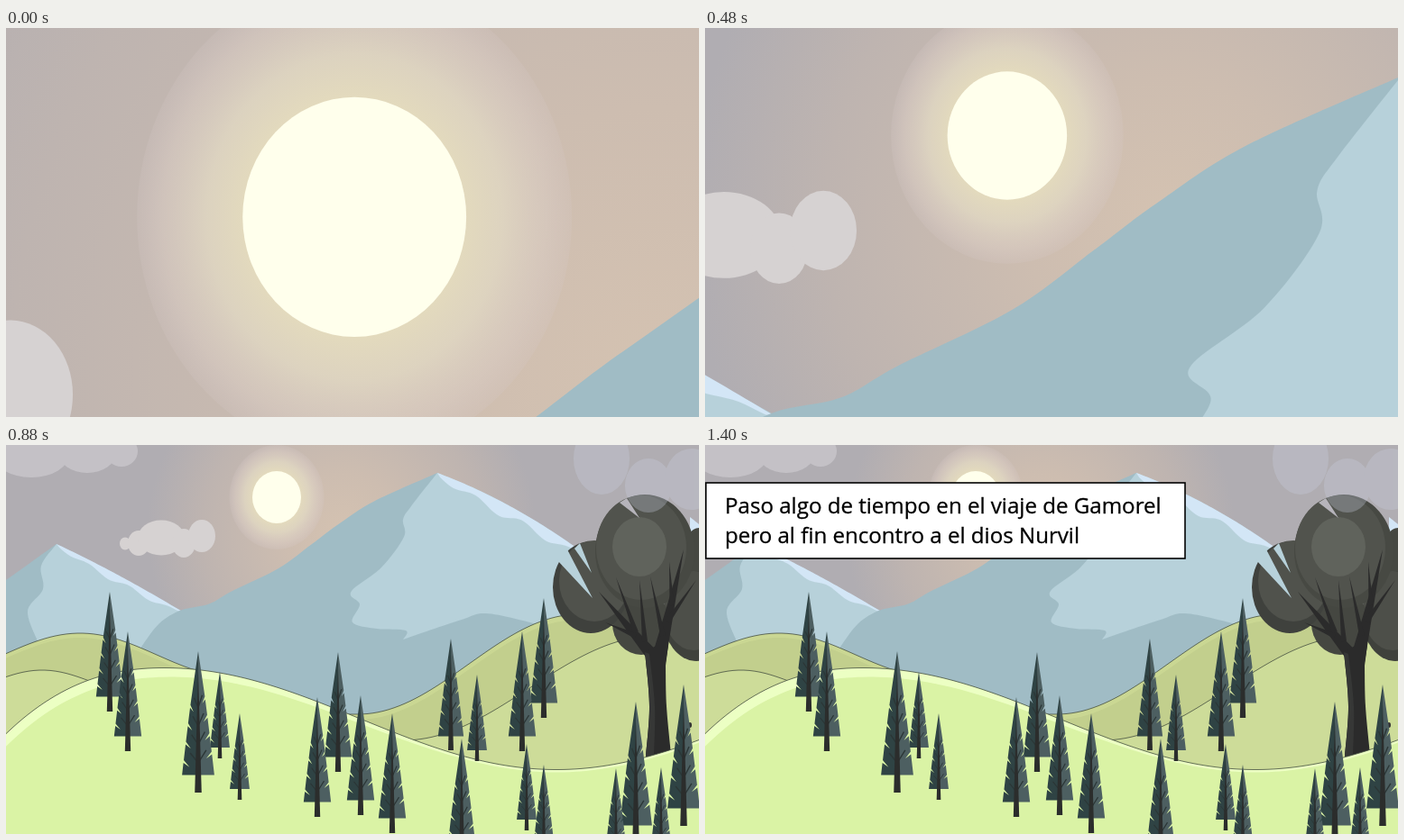
Animation, 768 px wide and 432 px high, one loop 1.92 s. Source, as an HTML page:

```html
<!DOCTYPE html>
<html lang="es">
<head>
<meta charset="utf-8">
<title>Paisaje</title>
<style>
  html, body { margin: 0; width: 100%; height: 100%; overflow: hidden; background: #b1aeb3; }
  svg { display: block; width: 100vw; height: 100vh; }
  text { font-family: "Open Sans", "Noto Sans", sans-serif; font-size: 24.1px; stroke: #000; stroke-width: .3; }
</style>
</head>
<body>
<svg viewBox="0 0 768 432">
  <defs>
    <radialGradient id="sky" gradientUnits="userSpaceOnUse" cx="372" cy="96" r="215">
      <stop offset="0" stop-color="#d4c2b1"/>
      <stop offset=".3" stop-color="#cdbdb0"/>
      <stop offset=".72" stop-color="#beb4b0"/>
      <stop offset="1" stop-color="#b0adb2"/>
    </radialGradient>
    <radialGradient id="halo">
      <stop offset=".5" stop-color="#e3dabd"/>
      <stop offset=".68" stop-color="#e0d7c2" stop-opacity=".85"/>
      <stop offset=".88" stop-color="#dacdc4" stop-opacity=".55"/>
      <stop offset="1" stop-color="#d6c9c8" stop-opacity=".2"/>
    </radialGradient>
    <g id="pine"></g>
  </defs>
  <g id="scene"></g>
  <g id="caption">
    <rect x="1" y="42" width="531" height="84" fill="#fff" stroke="#000" stroke-width="1.6"/>
    <text x="22" y="76">Paso algo de tiempo en el viaje de Gamorel</text>
    <text x="22" y="109">pero al fin encontro a el dios Nurvil</text>
  </g>
</svg>
<script>
const scene = document.getElementById("scene");
const caption = document.getElementById("caption");
const { PI, sin, cos, min, max, sqrt, hypot } = Math;
const clamp = v => min(1, max(0, v));

// Smooth curve through "x,y" points; "|" marks a corner between curves.
function smoothPath(spec) {
  return spec.split("|").map((part, i) => {
    const pts = part.trim().split(/\s+/).map(p => p.split(",").map(Number));
    let d = `${i ? "L" : "M"}${pts[0]}`;
    for (let k = 0; k < pts.length - 1; k++) {
      const a = pts[k - 1] || pts[k], b = pts[k], c = pts[k + 1], e = pts[k + 2] || c;
      const handle = (p, q, r, sign) => [0, 1].map(n => p[n] + sign * (r[n] - q[n]) / 6);
      d += `C${handle(b, a, c, 1)} ${handle(c, b, e, -1)} ${c}`;
    }
    return d;
  }).join("") + "Z";
}

const shape = (fill, spec) => `<path fill="${fill}" d="${smoothPath(spec)}"/>`;
const poly = (fill, points, extra = "") => `<polygon fill="${fill}" points="${points}" ${extra}/>`;
const oval = (fill, x, y, rx, ry) => `<ellipse fill="${fill}" cx="${x}" cy="${y}" rx="${rx}" ry="${ry}"/>`;
const cloud = (fill, opacity, puffs) =>
  `<g opacity="${opacity}">${puffs.map(p => oval(fill, ...p)).join("")}</g>`;

// Points of y = f(x), left to right.
function plot(f, from, to, step = 3) {
  const pts = [];
  for (let x = from; x < to; x += step) pts.push([x, f(x)]);
  return [...pts, [to, f(to)]];
}

const DARK_ROCK = "#a0bcc5", LIGHT_ROCK = "#b7d1da", SNOW = "#d3e6f6";

const sky = '<rect width="768" height="432" fill="url(#sky)"/>'
  + oval("url(#halo)", 300, 58, 52.5, 58)
  + oval("#ffffec", 300, 58, 27, 29);

const smallCloud = cloud("#d6d2d2", 1,
  [[132, 109.5, 6, 7], [147, 109, 12, 14], [172, 103, 26, 19.5], [197, 109, 13, 16], [217, 101, 15, 18]]);
const topClouds =
  cloud("#dddbe0", .45, [[28, 10, 42, 26], [90, 8, 32, 23], [128, 7, 18, 17]])
  + cloud("#cbd1e2", .3, [[660, 15, 31, 40], [712, 45, 26, 30], [760, 38, 30, 34]]);

// A slope falling to the right of a summit, and the rippled snow along it.
const slope = (x0, y0, fall, bend) => x => y0 + fall * (x - x0) + bend * (x - x0) ** 2;
function snow(ridge, from, to, depth) {
  const lower = x => {
    const u = clamp((x - from) / (to - from));
    return ridge(x) + depth * sqrt(max(0, sin(PI * u))) * (1 + .35 * sin(6 * PI * u));
  };
  return poly(SNOW, [...plot(ridge, from, to), ...plot(lower, from, to).reverse()].join(" "));
}
const leftRidge = slope(56, 110, .47, .0005);
const rightRidge = slope(478, 31, .37, .0011);

const leftMountain =
  shape(DARK_ROCK, "0,150 28,130 56,110 | 194,184 | 194,260 0,260")
  + shape(LIGHT_ROCK, "56,110 39,134 41,160 24,185 37,222 | 160,240 194,184 | 110,137 56,110")
  + snow(leftRidge, 56, 194, 8);

const rightMountain =
  poly(SNOW, "758,80 768,88 768,120 758,110")
  + shape(DARK_ROCK, "150,224 170,198 194,183.5 225,176.5 251,162 302,137 339,110 367,89 408,62.5 478,31 | 640,118 | 720,330 150,330")
  + shape(LIGHT_ROCK, "478,31 449,68 440,83 441,102 416,136 382.4,163 392,177 384,197 411,204 443,206 440,216 | 440,216 504,194.3 535,187.3 600,202 | 720,230 720,160 | "
      + plot(rightRidge, 478, 640, 40).reverse().join(" "))
  + snow(rightRidge, 478, 640, 13);

// Cosine hill between the crest (or trough) at x0 and the next turn half a wave away.
const wave = (x0, y0, rise, half) => x => y0 + rise / 2 * (1 - cos(PI * (x - x0) / half));
const between = (f, a, b) => x => f(min(b, max(a, x)));
const hill = (fill, f, from, to, line = true) =>
  poly(fill, [...plot(f, from, to, 6), [to, 440], [from, 440]].join(" "),
    line ? 'stroke="#465040" stroke-width=".8"' : "");
function litHill(light, body, f, from, to, rim) {
  return hill(light, f, from, to) + hill(body, x => f(x) + rim(x), from, to, false);
}

const frontTop = x => wave(175, 247.5, 113, 435)(x) + 6.3e-6 * max(0, 175 - x) ** 3;
const backHills =
  litHill("#cad793", "#c2cf8d", wave(82, 209, 48, 170), -5, 235, () => 5)
  + hill("#cddc99", wave(40, 250, 28, 115), -5, 130)
  + litHill("#cad793", "#c2cf8d", between(wave(390, 299, -111, 245), 390, 635), 370, 780, () => 6)
  + hill("#cddc99", between(wave(440, 328, -116, 280), 440, 720), 430, 780);
const frontHill = litHill("#ecffc3", "#daf3a5", frontTop, -5, 780, x => max(3, 14 - .022 * x));

// Tapered branch from its root to its tip.
function limb(x1, y1, x2, y2, width) {
  const k = width / 2 / hypot(x2 - x1, y2 - y1), dx = (y2 - y1) * k, dy = (x1 - x2) * k;
  return poly("#2b2b2b", [x1 + dx, y1 + dy, x2, y2, x1 - dx, y1 - dy]);
}
const bigTree =
  oval("#464842", 768, 140, 22, 48)
  + oval("#3f413c", 765, 190, 37, 50) + oval("#4d4f49", 762, 184, 33, 44)
  + oval("#454741", 704, 198, 32, 35)
  + oval("#3f413d", 648, 158, 42, 51) + oval("#50524c", 652, 151, 39, 45)
  + poly(LIGHT_ROCK, "611,128 622,116 650,170") + poly(LIGHT_ROCK, "630,115 636,109 649,142")
  + oval("#474943", 708, 118, 55, 63) + oval("#51534d", 704, 114, 50, 58)
  + oval("#60635c", 702, 113, 30, 33)
  + poly("#b6b4bb", "680,64 688,59 702,81")
  + limb(720, 238, 657, 163, 15) + limb(722, 244, 751, 116, 17)
  + limb(698, 208, 676, 147, 6) + limb(698, 212, 664, 197, 6) + limb(708, 218, 702, 150, 6)
  + limb(728, 212, 714, 146, 6) + limb(738, 178, 735, 130, 5) + limb(733, 196, 765, 150, 6)
  + shape("#2b2b2b", "709,346 713,290 708,230 | 722,222 734,222 | 731,245 732,290 737,343")
  + shape("#363736", "709,346 713,290 708,230 | 713,232 719,290 718,346")
  + oval("#333", 758, 311, 2, 3);

// Pine of height 100 with its tip at the origin; slits cut into both edges.
function pineSide(fill, sign, firstSlit) {
  const edge = y => 11.4 * (y / 87.5) ** .88;
  const pts = [[0, 0]];
  for (let y = firstSlit; y < 84; y += 13) {
    pts.push([sign * edge(y), y], [sign * edge(y) * .6, y + 5], [sign * edge(y + 2), y + 2]);
  }
  return poly(fill, [...pts, [sign * edge(87.5), 87.5], [0, 87.5]].join(" "));
}
let twigs = "";
for (let y = 40; y < 85; y += 13) twigs += `M${-y / 14} ${y - 7}L0 ${y}L${y / 14} ${y - 9}`;
document.getElementById("pine").innerHTML =
  pineSide("#2f4344", -1, 38) + pineSide("#4d5f61", 1, 32)
  + `<path d="${twigs}" fill="none" stroke="#2b3636" stroke-width=".9"/>`
  + poly("#2b2d2c", "0,14 2.4,100 -2.4,100");

// Tip positions grouped by tree height.
const pines = {
  96: [[237, 252], [259, 298], [522, 255], [577, 332], [596, 355], [676, 359], [726, 358]],
  124: [[493, 215]],
  133: [[115, 163], [135, 207], [368, 230], [345, 280], [393, 278], [428, 298], [596, 170], [572, 207], [505, 326]],
  157: [[213, 229], [698, 285], [751, 266]]
};
const forest = Object.entries(pines)
  .flatMap(([h, tips]) => tips.map(([x, y]) => ({ x, y, h: +h })))
  .sort((a, b) => a.y + a.h - b.y - b.h)
  .map(({ x, y, h }) => `<use href="#pine" transform="translate(${x} ${y}) scale(${h / 100})"/>`)
  .join("");

scene.innerHTML = sky + smallCloud + leftMountain + rightMountain + backHills
  + bigTree + frontHill + forest + topClouds;

const LOOP = 1920, STEP = 40, ZOOM_END = 880, ZOOM_TIME = 920, FADE_START = 1080, FADE_TIME = 320;
const FOCUS = { x: 276, y: 15.7 };

function draw() {
  const t = Math.floor(performance.now() % LOOP / STEP) * STEP;
  const left = clamp((ZOOM_END - t) / ZOOM_TIME);
  const zoom = 1 + 3.61 * left * left * (3 - 2 * left);
  scene.setAttribute("transform",
    `translate(${FOCUS.x} ${FOCUS.y}) scale(${zoom}) translate(${-FOCUS.x} ${-FOCUS.y})`);
  caption.setAttribute("opacity", clamp((t - FADE_START) / FADE_TIME));
  requestAnimationFrame(draw);
}
draw();
</script>
</body>
</html>
```
